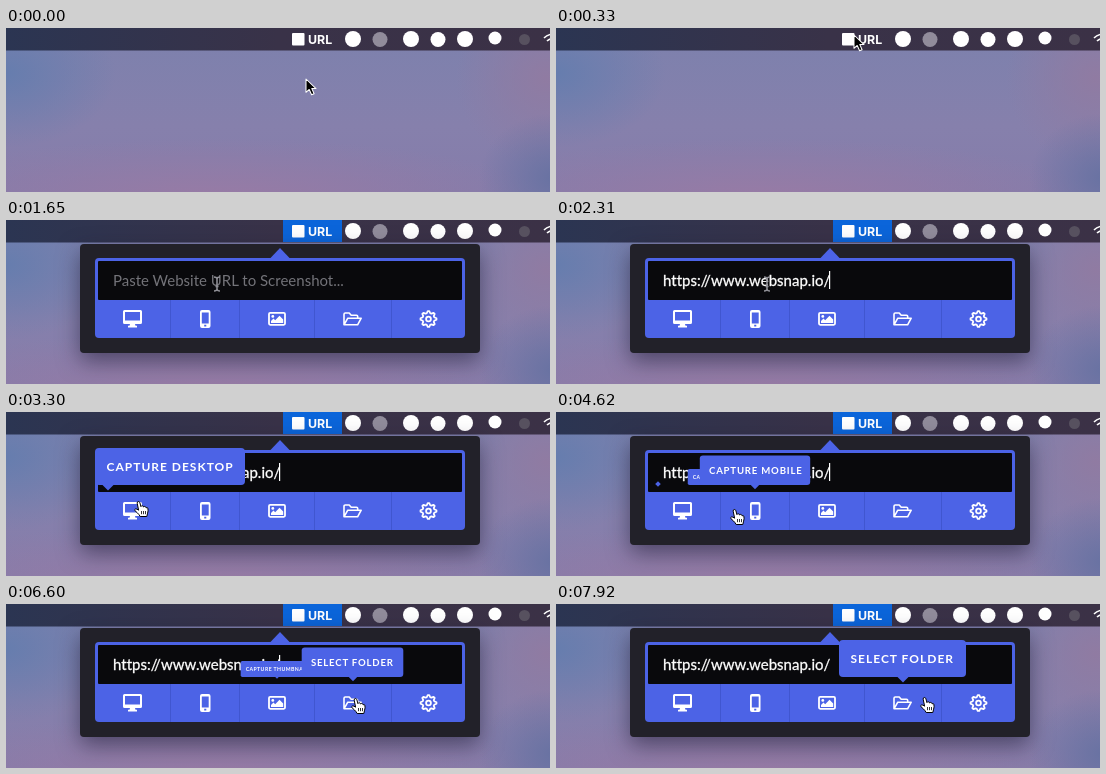
An HTML page that plays this animation: 544x164 px, repeating every 8 s.

```html
<!DOCTYPE html>
<html lang="en">
<head>
<meta charset="utf-8">
<title>Menu bar screenshot tool</title>
<style>
  html, body { margin: 0; width: 100%; height: 100%; overflow: hidden; }
  svg {
    display: block; width: 544px; height: 164px;
    background:
      radial-gradient(ellipse 75px 65px at 548px 150px, #6872a2 0%, #6872a200 100%),
      radial-gradient(ellipse 90px 90px at 540px 50px, #907ba2 0%, #907ba200 100%),
      radial-gradient(ellipse 110px 75px at 0 45px, #667dae 0%, #667dae00 100%),
      radial-gradient(ellipse 330px 60px at 210px 170px, #987ba5 0%, #987ba500 100%),
      linear-gradient(#7c81ad, #8680ac 60%, #857caa);
  }
  text { font-family: Lato, "Open Sans", sans-serif; white-space: pre; }
  .menu { font: 700 12.4px Inter, "Liberation Sans", sans-serif; fill: #fff; }
  .field { font-size: 15px; font-variant-ligatures: none; }
  #address { fill: #fff; stroke: #fff; stroke-width: .3px; }
  .tip text { font-size: 12px; font-weight: 700; letter-spacing: 1px; fill: #fff; }
  .tip { fill: #4c63e6; }
  .panel { filter: drop-shadow(0 8px 11px rgba(15, 12, 35, .5)); }
  .icon { fill: none; stroke: #fff; stroke-width: 1.8; stroke-linejoin: round; stroke-linecap: round; }
  .solid { fill: #fff; stroke: none; fill-rule: evenodd; }
</style>
</head>
<body>
<svg viewBox="0 0 544 164">
  <defs>
    <linearGradient id="bar">
      <stop offset="0" stop-color="#2b3552"/>
      <stop offset=".5" stop-color="#393248"/>
      <stop offset="1" stop-color="#3b3146"/>
    </linearGradient>
  </defs>

  <rect width="544" height="22.5" fill="url(#bar)"/>
  <rect id="active" x="277" width="59" height="22" fill="#0b65da"/>
  <rect x="286" y="5" width="12.5" height="12.5" rx="1" fill="#fff"/>
  <text class="menu" x="302" y="15.5">URL</text>
  <g fill="#fff">
    <circle cx="347" cy="11" r="8"/>
    <circle cx="374" cy="11.5" r="7.5" fill="#918c9b"/>
    <circle cx="405" cy="11" r="8"/>
    <circle cx="432" cy="11.5" r="7.5"/>
    <circle cx="459" cy="11" r="8"/>
    <circle cx="489" cy="10" r="6.5"/>
    <circle cx="518.5" cy="11.5" r="5.5" fill="#57515f"/>
  </g>
  <path d="M538 10Q541 7 546 6M541 13Q543 11 546 10.5" fill="none" stroke="#fff" stroke-width="1.6"/>

  <g id="popup">
    <rect class="panel" x="74" y="24" width="400" height="109" rx="4" fill="#222129"/>
    <path d="M274 28l10 10.5h-20z" fill="#4c63e6"/>
    <rect x="89" y="38" width="370" height="80" rx="4" fill="#4c63e6"/>
    <rect x="92" y="41" width="364" height="39" rx="1" fill="#09090c"/>
    <g id="dividers" stroke="#4056d0"></g>

    <g class="icon">
      <path class="solid" d="M118.5 90h16q1.5 0 1.5 1.5v11q0 1.5-1.5 1.5h-5.5l.5 1.8h1.5v1.7h-9v-1.7h1.5l.5-1.8h-5.5q-1.5 0-1.5-1.5v-11q0-1.5 1.5-1.5zM119 92v8.6h15V92z"/>
      <path class="solid" d="M196 90h6.5q2 0 2 2v14q0 2-2 2H196q-2 0-2-2V92q0-2 2-2zM195.8 92.4v11h6.9v-11zM198.2 104.7v1.8h2.1v-1.8z"/>
      <rect x="263" y="92.8" width="16" height="12" rx="1.2"/>
      <path class="solid" d="M265 103v-2l2.5-2.5 1.7 1.7 4.3-4.4 3.7 3.7V103z"/>
      <circle class="solid" cx="266.8" cy="96.4" r="1.4"/>
      <path d="M338 104.5v-10.3q0-1.2 1.2-1.2h4l2 2.2h5.3q1.2 0 1.2 1.2V98M338 104.8l3.8-6.6h13.4l-3.6 6.6z" stroke-width="1.6"/>
      <g id="gear" transform="translate(422.5 99)"></g>
    </g>

    <text class="field" id="hint" x="107" y="66" fill="#737379">Paste Website URL to Screenshot...</text>
    <text class="field" id="address" x="107" y="66">https://www.websnap.io/</text>
    <rect id="caret" y="51" width="1.2" height="18" fill="#fff"/>
    <g id="tips"></g>
  </g>

  <g id="arrow">
    <path d="M0 0V14.5L3.5 11.4 6.1 17.2 8.8 16 6.3 10.4H10.9z" transform="scale(.92)" fill="#000" stroke="#fff" stroke-width="1.1" stroke-linejoin="round"/>
  </g>
  <g id="beam">
    <path d="M-3-7Q0-7 0-5Q0-7 3-7M0-5V5M-3 7Q0 7 0 5Q0 7 3 7M-1.5 2.5h3" fill="none" stroke="#8f8f96" stroke-width="1.6"/>
  </g>
  <g id="hand">
    <path d="M4.6 9.2L3.2 2.2Q3 .6 4.3.5 5.5.4 5.9 1.8L6.9 5.6Q7.4 4.5 8.5 4.8 9.4 5 9.6 6 10.3 5.1 11.3 5.6 12 6 12.1 6.8 13.2 6.2 13.9 7.2 14.4 9.8 13.6 12.2L12.8 15.5H6.2Q5.2 13.6 3.3 11.8L.9 9.6Q.3 8.5 1.4 8 2.7 7.6 4.6 9.2z" fill="#fff" stroke="#000" stroke-width="1" stroke-linejoin="round"/>
    <path d="M7.5 10v3.2M9.5 10v3.2M11.5 10v3.2" stroke="#000" stroke-width=".8"/>
  </g>
</svg>

<script>
const LOOP = 8000;
const OPEN = 660;
const PASTE = 2310;

// label, arrow x, body centre x, body width
const TIPS = [
  ["CAPTURE DESKTOP", 102, 164, 150],
  ["CAPTURE MOBILE", 199, 199, 138],
  ["CAPTURE THUMBNAIL", 271, 271, 169],
  ["SELECT FOLDER", 347, 346.5, 127]
];

// start ms, pointer, x, y, caret shown, scale of each visible tip
const STEPS = [
  [0, "arrow", 300, 51, 0, {}],
  [330, "arrow", 298, 7, 0, {}],
  [660, "arrow", 298, 7, 1, {}],
  [990, "beam", 282, 50, 1, {}],
  [1320, "beam", 211, 64, 1, {}],
  [1650, "beam", 211, 64, 0, {}],
  [1980, "beam", 211, 64, 1, {}],
  [2970, "hand", 131, 92, 0, {}],
  [3300, "hand", 128, 89, 1, { 0: 1 }],
  [3630, "hand", 130, 91, 1, { 0: 1 }],
  [3960, "hand", 130, 91, 0, { 0: 1 }],
  [4290, "hand", 130, 91, 1, { 0: 1 }],
  [4620, "hand", 174, 97, 1, { 0: .43, 1: .8 }],
  [4950, "hand", 187, 97, 0, { 1: 1 }],
  [5280, "hand", 255, 97, 1, { 1: 1 }],
  [5610, "hand", 262, 94, 1, { 2: 1 }],
  [5940, "hand", 274, 94, 0, { 2: 1 }],
  [6600, "hand", 345, 94, 1, { 2: .43, 3: .8 }],
  [6930, "hand", 364, 93, 0, { 3: 1 }],
  [7260, "hand", 364, 93, 1, { 3: 1 }],
  [7920, "hand", 364, 93, 0, { 3: 1 }]
];

const $ = id => document.getElementById(id);
const show = (el, on) => el.setAttribute("visibility", on ? "inherit" : "hidden");

$("dividers").innerHTML = [164.5, 233.5, 308.5, 385.5].map(x => `<path d="M${x} 80v38"/>`).join("");

const teeth = Array.from({ length: 32 }, (_, i) => {
  const a = (i - .5) * Math.PI / 16;
  const r = i % 4 < 2 ? 8 : 6;
  return `${(r * Math.cos(a)).toFixed(2)},${(r * Math.sin(a)).toFixed(2)}`;
}).join(" ");
$("gear").innerHTML = `<polygon points="${teeth}"/><circle r="2.4"/>`;

$("tips").innerHTML = TIPS.map(([label, , , w]) => `<g class="tip">
  <path d="M-6.5 0L0-6.5 6.5 0 0 6.5z"/>
  <g><rect x="${-w / 2}" y="-37" width="${w}" height="37" rx="4"/>
  <text x="${11.5 - w / 2}" y="-14">${label}</text></g></g>`).join("");
const tips = [...$("tips").children];

function draw(t) {
  const [, pointer, x, y, caret, scales] = STEPS.findLast(s => s[0] <= t);
  const open = t >= OPEN;
  const pasted = t >= PASTE;
  show($("active"), open);
  show($("popup"), open);
  show($("hint"), !pasted);
  show($("address"), pasted);
  show($("caret"), caret);
  $("caret").setAttribute("x", pasted ? 273 : 107);

  for (const id of ["arrow", "beam", "hand"]) show($(id), id === pointer);
  $(pointer).setAttribute("transform", `translate(${x} ${y})`);

  tips.forEach((tip, i) => {
    const s = scales[i] || 0;
    const [, tail, centre] = TIPS[i];
    show(tip, s);
    tip.children[0].setAttribute("transform", `translate(${tail} 72) scale(${s})`);
    tip.children[1].setAttribute("transform", `translate(${centre} 73) scale(${s})`);
  });
}

const start = performance.now();
function tick() {
  draw((performance.now() - start) % LOOP);
  requestAnimationFrame(tick);
}
tick();
</script>
</body>
</html>
```
